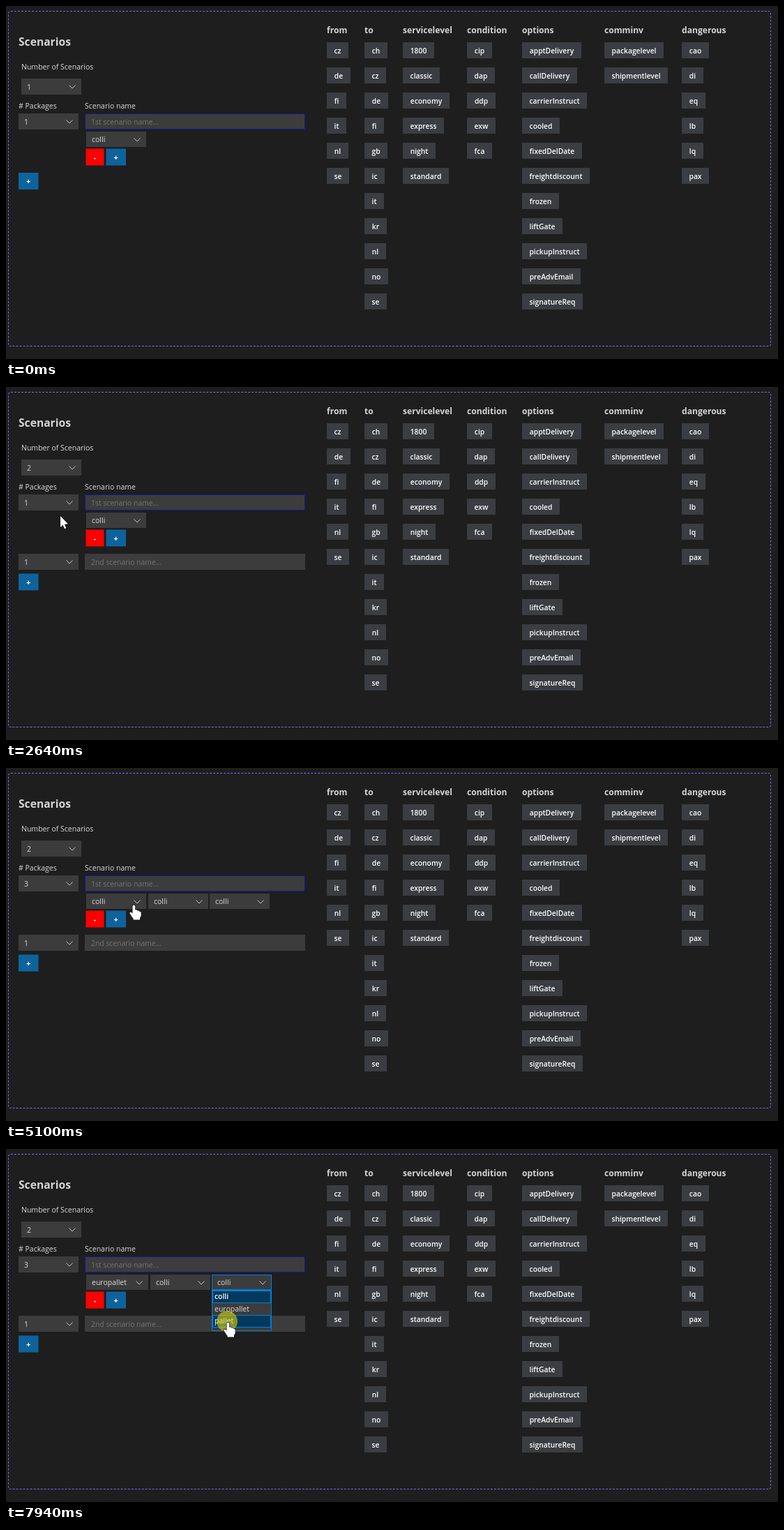
These frames come from a looping animation (1107 by 506 pixels, 8 s). An HTML page with a canvas:

```html
<!DOCTYPE html>
<html lang="en">
<head>
<meta charset="utf-8">
<title>Scenarios</title>
<style>
  html, body { margin: 0; width: 100%; height: 100%; overflow: hidden; background: #1e1e1e; }
  canvas { position: absolute; left: 0; top: 0; }
  .panel {
    position: absolute; left: 3px; top: 7px; width: 1094px; height: 481px;
    box-sizing: border-box; border: 1px dashed #7b68ee; border-radius: 4px;
  }
</style>
</head>
<body>
<div class="panel"></div>
<canvas id="stage" width="1107" height="506"></canvas>
<script>
const ctx = document.getElementById('stage').getContext('2d');
const LOOP = 8000;
const FAMILY = '"Open Sans", "Noto Sans", sans-serif';
const font = (size, weight = 400) => `${weight} ${size}px ${FAMILY}`;
const LABEL = font(10.5), TAG = font(10.3, 600), ACTIVE = font(10.3, 600);
const HEAD = font(12.1, 700), TITLE = font(15.65, 700);
const BLUE = '#007fd4', FIELD = '#3c3c3c', TEXT = '#dcdcdc';

const columns = [
  [460, 'from', 'cz de fi it nl se'],
  [514, 'to', 'ch cz de fi gb ic it kr nl no se'],
  [569, 'servicelevel', '1800 classic economy express night standard'],
  [661, 'condition', 'cip dap ddp exw fca'],
  [740, 'options', 'apptDelivery callDelivery carrierInstruct cooled fixedDelDate ' +
    'freightdiscount frozen liftGate pickupInstruct preAdvEmail signatureReq'],
  [858, 'comminv', 'packagelevel shipmentlevel'],
  [969, 'dangerous', 'cao di eq lb lq pax']
];
const counts = [...'123456789'];
const kinds = ['colli', 'europallet', 'pallet'];

// start, end, number of steps, target x, target y
const moves = [
  [120, 800, 11, 62, 130],
  [940, 1140, 3, 64, 124],
  [1550, 1830, 5, 64, 153],
  [2350, 2640, 5, 77, 184],
  [2840, 3520, 10, 62, 169],
  [3720, 3930, 4, 62, 200],
  [4060, 4260, 4, 62, 219],
  [4540, 5100, 8, 182, 195],
  [5160, 5230, 2, 182, 189],
  [5440, 5830, 6, 154, 223],
  [6160, 6560, 6, 352, 196],
  [6900, 7450, 9, 318, 252],
  [7520, 7590, 2, 317, 248],
  [7790, 7790, 1, 317, 247]
];
const clicks = [1340, 2210, 3590, 4330, 5300, 6020, 6700, 7940];
const PRESS = 140;

const between = (t, from, to) => t >= from && t < to;
const ease = p => p * p * (3 - 2 * p);

function pointer(t) {
  let x = 900, y = 413;
  for (const [start, end, steps, toX, toY] of moves) {
    if (t < start) break;
    const gap = (end - start) / Math.max(1, steps - 1);
    const done = gap ? Math.min(steps, Math.floor((t - start) / gap + 0.01) + 1) : steps;
    const p = ease(done / steps);
    x += (toX - x) * p;
    y += (toY - y) * p;
  }
  return { x, y };
}

function rect(x, y, w, h, color) {
  ctx.fillStyle = color;
  ctx.fillRect(x, y, w, h);
}

function outline(x, y, w, h, color) {
  ctx.strokeStyle = color;
  ctx.lineWidth = 1;
  ctx.strokeRect(x + 0.5, y + 0.5, w - 1, h - 1);
}

function text(str, x, y, style = LABEL, color = TEXT, align = 'left') {
  ctx.font = style;
  ctx.fillStyle = color;
  ctx.textAlign = align;
  ctx.fillText(str, x, y);
}

function button(label, x, y, w, color) {
  rect(x, y, w, 24, color);
  text(label, x + w / 2, y + 16, font(11, 700), '#fff', 'center');
}

function input(placeholder, y, border) {
  rect(113, y, 316, 23, FIELD);
  if (border) outline(113, y, 316, 23, border);
  text(placeholder, 122, y + 16, font(10.4), '#757575');
}

function select(value, x, y, w = 86, h = 23, focused = false) {
  rect(x, y, w, h, FIELD);
  if (focused) outline(x, y, w, h, BLUE);
  text(value, x + 8, y + Math.ceil(h / 2) + 4);
  const right = x + w - 13;
  ctx.beginPath();
  ctx.moveTo(right - 4.5, y + 9.5);
  ctx.lineTo(right, y + 14);
  ctx.lineTo(right + 4.5, y + 9.5);
  ctx.strokeStyle = '#c5c5c5';
  ctx.lineWidth = 1;
  ctx.stroke();
}

function dropdown(items, x, y, bottom, cursor) {
  const w = 86;
  const edge = i => Math.round(y + 1 + i * 17.6);
  rect(x, y, w, bottom - y, FIELD);
  items.forEach((item, i) => {
    const top = edge(i), height = edge(i + 1) - top;
    const lit = i === 0 || between(cursor.y, top, top + height);
    if (lit) {
      rect(x + 1, top, w - 2, height, '#04395e');
      outline(x + 1, top, w - 2, height, BLUE);
    }
    const style = i === 0 ? ACTIVE : LABEL;
    text(item, x + 4, top + 12, style, lit ? '#fff' : TEXT);
  });
  outline(x, y, w, bottom - y, BLUE);
}

function drawColumns() {
  for (const [x, title, tags] of columns) {
    text(title, x, 39, HEAD, '#d4d4d4');
    tags.split(' ').forEach((tag, row) => {
      const y = 52 + row * 36;
      ctx.font = TAG;
      const w = Math.round(ctx.measureText(tag).width + 21.3);
      rect(x, y, w, 23, '#3a3d41');
      text(tag, x + w / 2, y + 16, TAG, '#fff', 'center');
    });
  }
}

function drawForm(t, cursor) {
  const two = t >= 2280, three = t >= 4470, euro = t >= 6160;
  text('Scenarios', 18, 57, TITLE, '#d4d4d4');
  text('Number of Scenarios', 22, 91);
  text('# Packages', 18, 147);
  text('Scenario name', 113, 147);

  select(two ? '2' : '1', 22, 104, 86, 23, between(t, 1340, 2280));
  select(three ? '3' : '1', 18, 154, 86, 23, between(t, 3590, 4470));
  input('1st scenario name...', 154, '#1515a0');

  const shift = euro ? 3 : 0;
  select(euro ? 'europallet' : 'colli', 115, 180, 86 + shift, 22, between(t, 5300, 6160));
  if (three) {
    select('colli', 204 + shift, 180, 86, 22);
    select('colli', 292 + shift, 180, 86, 22, t >= 6700);
  }
  button('-', 114.5, 204.5, 26, '#ff0000');
  button('+', 143.5, 204.5, 28.5, '#0e639c');
  if (two) {
    select('1', 18, 239);
    input('2nd scenario name...', 239);
  }
  button('+', 18, two ? 267.5 : 239, 28.5, '#0e639c');

  if (between(t, 1410, 2280)) dropdown(counts, 22, 127, 297, cursor);
  if (between(t, 3650, 4470)) dropdown(counts, 18, 177, 341, cursor);
  if (between(t, 5370, 6160)) dropdown(kinds, 115, 202, 261, cursor);
  if (t >= 6770) dropdown(kinds, 295, 202, 261, cursor);
}

const HAND = new Path2D(
  'M-1.5 2Q-1.3.5.3.5T2.2 2V7.5Q4.6 6.8 5.2 8.4Q7.4 7.8 8 9.5' +
  'Q10.6 9.2 10.7 11.5V15Q10.6 17 9 18.8V21.5H-.5V19.5' +
  'Q-2.5 17.8-3.5 15.5L-5.6 12.6Q-6 10.7-4.2 10.5Q-2.7 10.7-1.5 12.8Z');
const ARROW = new Path2D('M0 0V16L3.6 12.7L6 18.2L8.3 17.2L6 11.8L11 11.3Z');

function drawPointer(t, { x, y }) {
  if (t < 120) return;
  if (clicks.some(c => between(t, c, c + PRESS))) {
    ctx.fillStyle = 'rgba(242, 226, 0, 0.54)';
    ctx.beginPath();
    ctx.arc(x, y, 15, 0, Math.PI * 2);
    ctx.fill();
  }
  const arrow = t < 1000 || between(t, 2420, 3000) || between(t, 4600, 4950);
  const shape = arrow ? ARROW : HAND;
  ctx.save();
  ctx.translate(Math.round(x) + 1, Math.round(y) + 1);
  ctx.lineWidth = 1.4;
  ctx.strokeStyle = '#111';
  ctx.stroke(shape);
  ctx.fillStyle = '#fff';
  ctx.fill(shape);
  ctx.restore();
}

function frame(now) {
  const t = now % LOOP;
  const cursor = pointer(t);
  ctx.clearRect(0, 0, 1107, 506);
  drawColumns();
  drawForm(t, cursor);
  drawPointer(t, cursor);
  requestAnimationFrame(frame);
}
requestAnimationFrame(frame);
</script>
</body>
</html>
```
